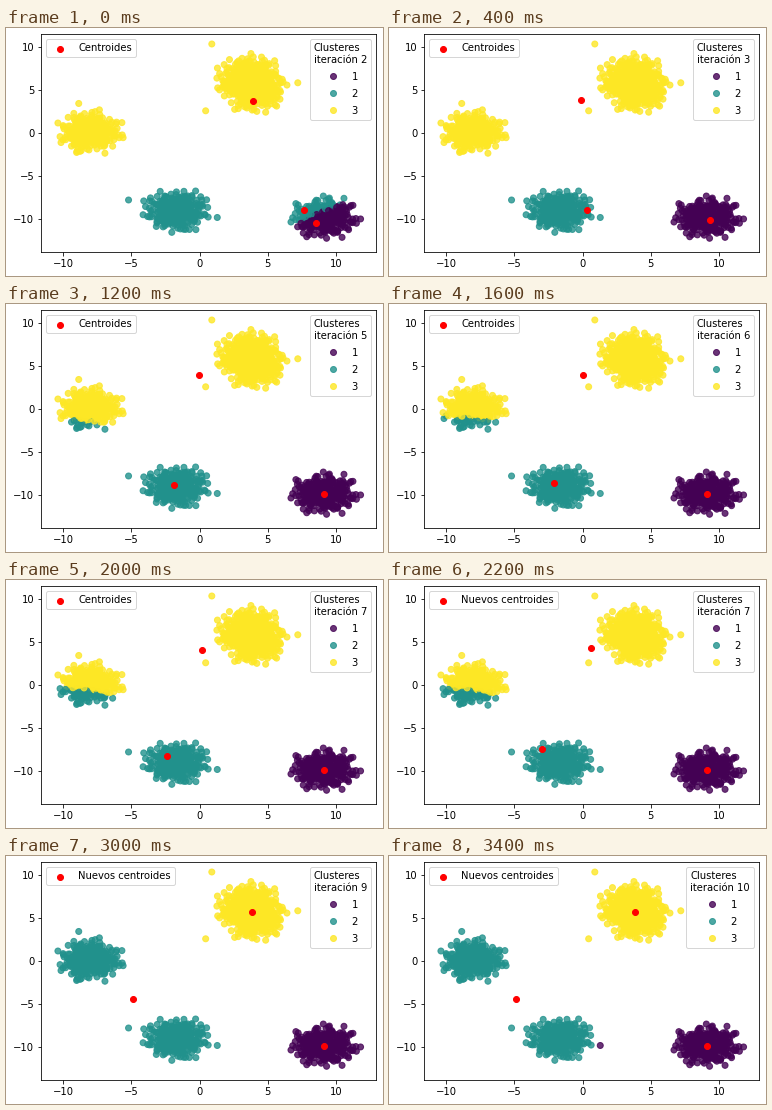
Write a matplotlib script that moves like this. It is 377 px wide and 248 px high and loops after 3600 ms.

```python
import numpy as np
import matplotlib.pyplot as plt
from matplotlib.animation import FuncAnimation

plt.rcParams["font.family"] = "DejaVu Sans"

W, H, DPI = 377, 248, 72
STEPS, INTERVAL = 18, 200
FIRST_ITERATION = 2
BLOB_SIZE = 300
GOLDEN_ANGLE = np.pi * (3 - np.sqrt(5))

# two of the five blobs overlap at the upper right
BLOB_CENTERS = [(-8, 0.05), (-1.73, -9.03), (9.1, -9.85),
                (3.72, 6.5), (3.92, 4.87)]
STRAYS = [(-8.85, 3.4), (-5.2, -7.8), (1.3, -9.83), (11.8, -10),
          (0.9, 10.3), (0.45, 2.55), (7.2, 5.8)]
START = [(8.51, -10.42), (7.63, -8.92), (3.9, 3.71)]


def blob(center, rng):
    """Gaussian cloud with evenly ranked radii and jittered angles."""
    i = np.arange(BLOB_SIZE)
    radius = np.sqrt(-2 * np.log(1 - 0.975 * (i + 0.5) / BLOB_SIZE))
    angle = GOLDEN_ANGLE * i + rng.normal(0, 0.3, BLOB_SIZE)
    offsets = radius * np.array([np.cos(angle), np.sin(angle)])
    return np.array(center) + offsets.T


def make_points(rng):
    clouds = [blob(center, rng) for center in BLOB_CENTERS]
    return rng.permutation(np.vstack(clouds + [STRAYS]))


def nearest(points, centers):
    gaps = points[:, None, :] - centers[None, :, :]
    return (gaps ** 2).sum(axis=2).argmin(axis=1)


def k_means(points, centers, rounds):
    """Labels, centroids before and centroids after each iteration."""
    history = []
    for _ in range(rounds):
        labels = nearest(points, centers)
        moved = np.array([points[labels == k].mean(axis=0)
                          for k in range(len(centers))])
        history.append((labels + 1, centers, moved))
        centers = moved
    return history


points = make_points(np.random.default_rng(7))
history = k_means(points, np.array(START), STEPS // 2)

# the tiny margin guards against the canvas size being truncated
fig = plt.figure(figsize=((W + 1e-6) / DPI, (H + 1e-6) / DPI), dpi=DPI,
                 facecolor="white")
ax = fig.add_axes([35.2 / W, 24.3 / H, 334.8 / W, 217.44 / H])


def draw(step):
    iteration, moved = divmod(step, 2)
    labels, before, after = history[iteration]
    centroids = after if moved else before

    ax.clear()
    dots = ax.scatter(*points.T, c=labels, cmap="viridis", alpha=0.8)
    ax.scatter(*centroids.T, c="red",
               label="Nuevos centroides" if moved else "Centroides")
    ax.set(xlim=(-11.6, 12.93), ylim=(-13.8, 11.43),
           xticks=range(-10, 11, 5), yticks=range(-10, 11, 5))
    title = f"Clusteres\niteración {iteration + FIRST_ITERATION}"
    ax.add_artist(ax.legend(*dots.legend_elements(), loc="upper right",
                            title=title))
    ax.legend(loc="upper left")
    return []


anim = FuncAnimation(fig, draw, frames=STEPS, interval=INTERVAL,
                     init_func=lambda: draw(0), repeat=True, repeat_delay=0)

plt.show()
```
